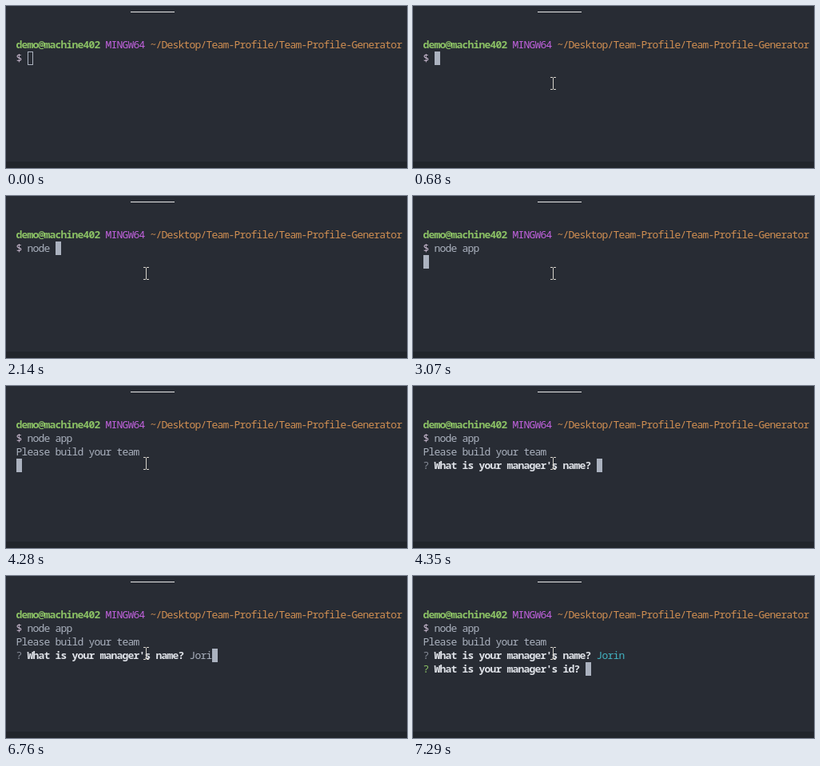
An HTML page with a canvas for the animation above (8 s loop, 502x203 px).

```html
<!DOCTYPE html>
<html lang="en">
<head>
<meta charset="utf-8">
<title>Terminal session</title>
<style>
  html, body { margin: 0; width: 100%; height: 100%; overflow: hidden; background: #282c34; }
  canvas { display: block; }
</style>
</head>
<body>
<canvas id="stage" width="502" height="203"></canvas>
<script>
const ctx = document.getElementById('stage').getContext('2d', { alpha: false });
const LOOP = 8000, CELL = 7, LINE = 17, LEFT = 13, TOP = 40;
const FONT = '13px "Noto Sans Mono", "DejaVu Sans Mono", monospace';
const C = {
  bg: '#282c34', footer: '#21252b', fg: '#abb2bf', bright: '#dfe2e8', line: '#e7e7e7', pointer: '#d7d3cb',
  dim: '#858b96', green: '#8cc265', purple: '#c162de', orange: '#d18f52', cyan: '#42b3c2', prompt: '#cbbbd1'
};
const COMMAND = 'node app', COMMAND_KEYS = [1610, 1680, 1880, 2010, 2140, 2340, 2470, 2670];
const ANSWER = 'Jorin', ANSWER_KEYS = [6220, 6490, 6560, 6760, 7020];
const ENTER = 3070, GREETING = 4280, QUESTION = 4350, SUBMIT = 7290;
const POINTER_IN = 70, POINTER_STEP = 76, POINTER_MOVES = 5, FOCUS = 680;

const typed = (text, keys, t) => text.slice(0, keys.filter(k => k <= t).length);

function rect(x, y, w, h, color) {
  ctx.fillStyle = color;
  ctx.fillRect(x, y, w, h);
}

// Writes [text, color, weight] runs on a row of the cell grid and returns the column after them.
function write(row, ...runs) {
  let col = 0;
  for (const [text, color, weight = 400] of runs) {
    ctx.font = `${weight} ${FONT}`;
    ctx.letterSpacing = '0px';
    const spacing = CELL - ctx.measureText('0').width;
    ctx.letterSpacing = `${spacing}px`;
    ctx.fillStyle = color;
    ctx.fillText(text, LEFT + col * CELL + spacing / 2, TOP + row * LINE + 13);
    col += text.length;
  }
  return col;
}

function drawCursor(row, col, focused) {
  const x = LEFT + col * CELL, y = TOP + row * LINE;
  if (focused) return rect(x, y, CELL, LINE, C.fg);
  ctx.strokeStyle = C.fg;
  ctx.strokeRect(x + 0.5, y + 0.5, CELL - 1, LINE - 1);
}

function drawPointer(t) {
  if (t < POINTER_IN) return;
  const step = Math.floor((t - POINTER_IN) / POINTER_STEP);
  const left = Math.max(0, 1 - step / POINTER_MOVES);
  const x = Math.round(175 + 137 * left ** 2), y = Math.round(97 + 80 * left ** 2.2);
  rect(x, y - 7, 1, 14, C.pointer);
  for (const dy of [-8, 7]) {
    rect(x - 3, y + dy, 3, 1, C.pointer);
    rect(x + 1, y + dy, 3, 1, C.pointer);
  }
}

function draw(t) {
  rect(0, 0, 502, 203, C.bg);
  rect(156, 7, 55, 1, C.line);
  rect(0, 195, 502, 8, C.footer);

  write(0, ['demo@machine402 ', C.green, 600], ['MINGW64 ', C.purple, 500],
    ['~/Desktop/Team-Profile/Team-Profile-Generator', C.orange]);
  let row = 1;
  let col = write(1, ['$ ', C.prompt, 500], [typed(COMMAND, COMMAND_KEYS, t), C.fg]);
  if (t >= ENTER) [row, col] = [2, 0];
  if (t >= GREETING) {
    write(2, ['Please build your team', C.fg]);
    [row, col] = [3, 0];
  }
  if (t >= QUESTION) {
    const done = t >= SUBMIT;
    col = write(3, ['? ', C.dim], ["What is your manager's name? ", C.bright, 700],
      [typed(ANSWER, ANSWER_KEYS, t), done ? C.cyan : C.fg]);
    if (done) {
      row = 4;
      col = write(4, ['? ', C.green], ["What is your manager's id? ", C.bright, 700]);
    }
  }
  drawCursor(row, col, t >= FOCUS);
  drawPointer(t);
}

const start = performance.now();
function tick() {
  draw((performance.now() - start) % LOOP);
  requestAnimationFrame(tick);
}
tick();
</script>
</body>
</html>
```
